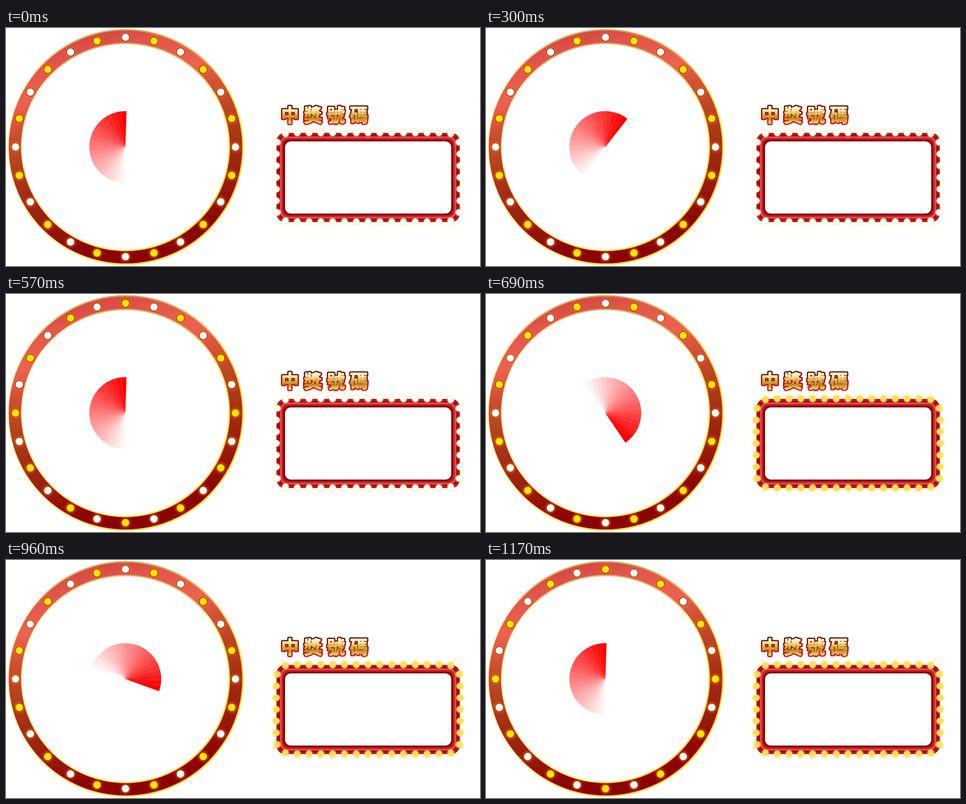
An HTML page with a canvas that plays this animation: 1055 by 531 pixels, repeating every 1.2 s.

```html
<!DOCTYPE html>
<html lang="zh-Hant">
<head>
<meta charset="utf-8">
<style>
html, body { margin: 0; width: 100%; height: 100%; overflow: hidden; background: #fff; }
canvas { display: block; }
</style>
</head>
<body>
<canvas id="stage" width="1055" height="531"></canvas>
<script>
const ctx = document.getElementById('stage').getContext('2d');
const TAU = Math.PI * 2, LOOP = 1200, STEP = 30;
const CX = 266, CY = 265.5;

// Colours are spread evenly unless given as [offset, colour].
function blend(x0, y0, x1, y1, stops) {
  const g = ctx.createLinearGradient(x0, y0, x1, y1);
  stops.forEach((s, i) => Array.isArray(s) ? g.addColorStop(...s) : g.addColorStop(i / (stops.length - 1), s));
  return g;
}

function disc(x, y, r, fill) {
  ctx.beginPath();
  ctx.arc(x, y, r, 0, TAU);
  ctx.fillStyle = fill;
  ctx.fill();
}

function glow(x, y, r0, r1, rgb, alpha) {
  const g = ctx.createRadialGradient(x, y, r0, x, y, r1);
  g.addColorStop(0, `rgba(${rgb},${alpha})`);
  g.addColorStop(1, `rgba(${rgb},0)`);
  disc(x, y, r1, g);
}

function band(outer, inner, fill) {
  ctx.beginPath();
  ctx.arc(CX, CY, outer, 0, TAU);
  ctx.arc(CX, CY, inner, 0, TAU, true);
  ctx.fillStyle = fill;
  ctx.fill();
}

function drawRing(flipped) {
  const gold = blend(80, 80, 452, 452, ['#fff6c4', '#fbf0b2', '#f4e48c', '#ffe14a', '#ffd11a']);
  const topGold = blend(0, 3, 0, 130, ['rgba(190,140,50,.75)', 'rgba(190,140,50,0)']);
  const red = blend(205, 0, 327, 531, [
    [0, '#d3443e'], [.1, '#e2564b'], [.23, '#ec6250'], [.34, '#cf4f31'],
    [.47, '#b4421d'], [.6, '#a42c14'], [.75, '#981a0b'], [.88, '#8c0402'], [1, '#8b0000']
  ]);
  band(263, 229.5, gold);
  band(263, 229.5, topGold);
  band(259.8, 232.5, red);
  for (let i = 0; i < 24; i++) {
    const a = i * TAU / 24;
    const x = CX + 244.7 * Math.sin(a), y = CY - 244.7 * Math.cos(a);
    glow(x, y, 7, 15, '255,120,20', .5);
    disc(x, y, 9.5, y < CY ? '#9c2606' : '#b8480c');
    disc(x, y, 8.2, (i % 2 === 1) !== flipped ? '#ffe600' : '#fff');
  }
}

// Sectors fade out behind the leading edge.
function drawFan(turn) {
  const slices = 20, width = Math.PI / slices;
  for (let i = 0; i < slices; i++) {
    const end = turn - Math.PI / 2 - i * width;
    ctx.beginPath();
    ctx.moveTo(265.5, 265.5);
    ctx.arc(265.5, 265.5, 80, end - width, end);
    ctx.fillStyle = `rgba(255,0,0,${1 - i / slices})`;
    ctx.fill();
  }
}

function drawTitle() {
  ctx.font = '700 40px "Noto Sans CJK TC", "Noto Sans CJK JP", "Noto Sans CJK", sans-serif';
  ctx.textAlign = 'center';
  ctx.textBaseline = 'alphabetic';
  ctx.lineJoin = 'round';
  const edge = blend(0, 172, 0, 216, ['#5e1414', '#7d1010', '#c00c10', '#e01018']);
  const gold = blend(0, 175, 0, 213, [
    [0, '#fffbe0'], [.25, '#f6e7a0'], [.5, '#d9ad42'], [.72, '#c08a1e'], [1, '#fbe88c']
  ]);
  const chars = [...'中獎號碼'];
  const each = draw => chars.forEach((c, i) => draw(c, 632 + i * 51.2, 209));
  ctx.strokeStyle = edge;
  ctx.lineWidth = 7;
  each((c, x, y) => ctx.strokeText(c, x, y));
  ctx.strokeStyle = ctx.fillStyle = gold;
  ctx.lineWidth = 1.4;
  each((c, x, y) => { ctx.strokeText(c, x, y); ctx.fillText(c, x, y); });
}

function panel(inset, radius, fill) {
  ctx.beginPath();
  ctx.roundRect(602 + inset, 234 + inset, 408 - 2 * inset, 199 - 2 * inset, radius);
  ctx.fillStyle = fill;
  ctx.fill();
}

function frameBulbs() {
  const list = [], gap = 26.27;
  for (let i = 0; i < 15; i++) {
    const nudge = i % 14 ? 0 : 2;
    list.push([622 + i * gap, 234 + nudge], [622 + i * gap, 432 - nudge]);
  }
  for (let i = 0; i < 7; i++) {
    const nudge = i % 6 ? 0 : 2;
    list.push([602 + nudge, 255 + i * 26.1], [1010 - nudge, 255 + i * 26.1]);
  }
  return list;
}
const bulbs = frameBulbs();

function drawFrame(lit) {
  for (const [x, y] of bulbs) glow(x, y, 5, 13, lit ? '255,228,90' : '255,240,165', lit ? .75 : .65);
  panel(0, 19, blend(0, 234, 0, 433, ['#b3191b', '#a00c0e', '#b3191b']));
  panel(5, 17, '#8f0508');
  panel(7, 16, '#d42a2c');
  panel(9, 15, '#e85855');
  panel(11, 14, '#cf2326');
  panel(14, 14, '#b00d12');
  panel(16, 15, '#790006');
  panel(19, 13, '#fff');
  for (const [x, y] of bulbs) {
    glow(x, y, 6, 10, lit ? '255,220,90' : '255,238,170', .5);
    disc(x, y, 7, lit ? '#ffdc5c' : '#fff');
  }
}

function render(now) {
  const n = Math.floor(now % LOOP / STEP);
  ctx.fillStyle = '#fff';
  ctx.fillRect(0, 0, 1055, 531);
  drawRing(Math.floor(n / 5) % 2 === 1);
  // The fan skips one position right after the loop starts.
  drawFan((2 + 36 * (n ? n + 1 : 0)) * Math.PI / 180);
  drawTitle();
  drawFrame(n >= 20);
}

const start = performance.now();
function tick() {
  render(performance.now() - start);
  requestAnimationFrame(tick);
}
tick();
</script>
</body>
</html>
```
